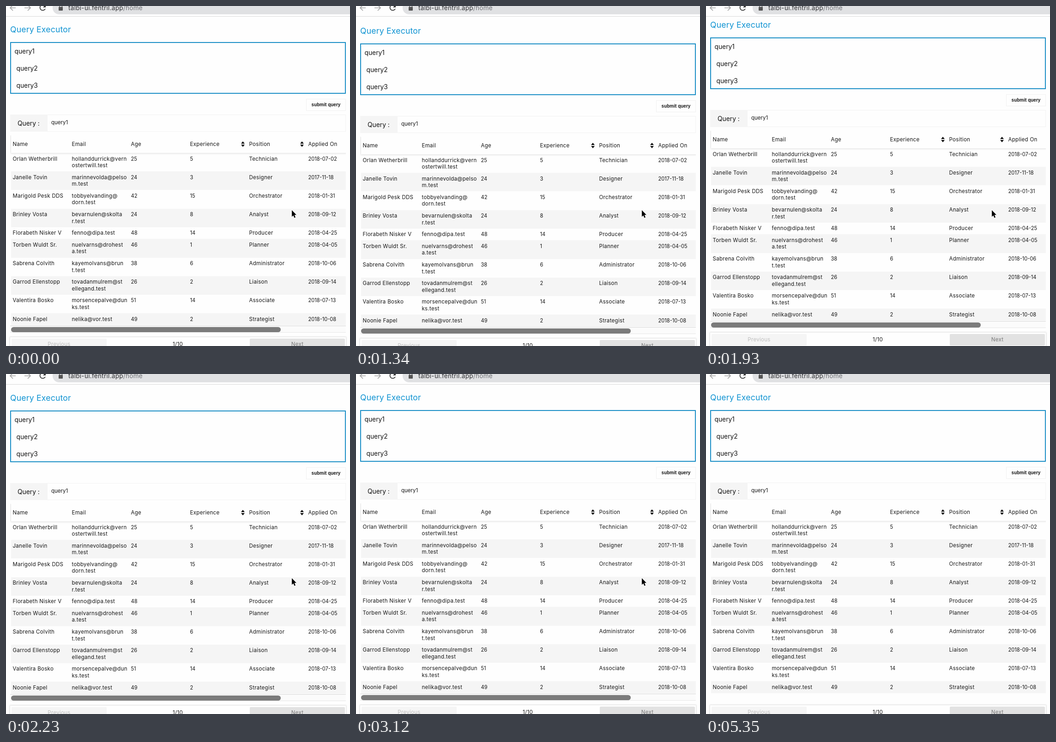
An HTML page that plays this animation: 745x736 px, repeating every 5.37 s.

```html
<!DOCTYPE html>
<html lang="en">
<head>
<meta charset="utf-8">
<title>Query Executor</title>
<style>
html, body { margin: 0; width: 100%; height: 100%; overflow: hidden; background: #fefefe; }
body { position: relative; font: 11.5px Inter, sans-serif; letter-spacing: .3px; color: #161616; }
div, span, svg { box-sizing: border-box; }
#bar, #page, #page > *, #bar > *, #cursor, #track, #thumb { position: absolute; }
#bar { left: 0; top: 0; width: 745px; height: 23px; overflow: hidden; background: #fefefe; border-bottom: 1px solid #d9d9d9; }
#pill { left: 101px; top: -10px; width: 680px; height: 28px; border-radius: 14px; background: #e0e1e3; }
#url { left: 135px; top: -6px; line-height: 20px; font-size: 13.5px; white-space: nowrap; color: #2b2c2f; }
#url i { font-style: normal; color: #6d6f73; }
#page { left: 0; top: 0; width: 745px; height: 760px; }
.t { line-height: 20px; white-space: nowrap; }
.big { font-size: 13.8px; letter-spacing: 0; color: #111; }
#title { left: 9px; top: 41px; font-size: 17.6px; letter-spacing: .2px; color: #0f93d2; }
#editor { left: 9px; top: 78px; width: 727px; height: 112px; border: 2px solid #1c8fc6; }
#submit { left: 650px; top: 201px; width: 86px; height: 26px; border: 1px solid #f1f1f1; text-align: center;
  font: bold 10px/24px "Liberation Sans", Arial, sans-serif; letter-spacing: 0; }
#field { left: 9px; top: 235px; width: 727px; height: 37px; border: 1px solid #f2f2f2; }
#label { left: 9px; top: 235px; width: 81px; height: 37px; background: #f5f5f5; }
#view { left: 9px; top: 280px; width: 727px; height: 428px; overflow: hidden; }
#table { position: absolute; left: 2px; top: 0; width: 896px; }
.row { display: flex; }
.row > span { width: 128px; padding: 5.5px 0 5.5px 3.5px; line-height: 14.6px; white-space: nowrap; }
.row:nth-child(odd):not(.head) { background: #f5f5f5; }
.row .num { font-size: 11.1px; letter-spacing: 0; }
.row.head { position: relative; height: 38px; box-shadow: 0 0 4px 1px #ddd; background: #fefefe; }
.head > span { position: relative; line-height: 38px; padding-top: 0; padding-bottom: 0; }
.sort::before, .sort::after { content: ""; position: absolute; left: 114px; border: solid transparent; border-width: 0 4.5px; }
.sort::before { top: 13px; border-bottom: 5px solid #111; }
.sort::after { top: 20px; border-top: 5px solid #111; }
#track { left: 0; top: 412px; width: 727px; height: 15px; background: #fbfbfb; border: solid #e6e6e6; border-width: 1px 0; border-top-color: #d6d6d6; }
#thumb { top: 2px; width: 584px; height: 11px; border-radius: 5.5px; background: #7b7b7b; }
#pager { left: 9px; top: 717px; width: 727px; height: 40px; box-shadow: 0 0 3px 1px #ddd; background: #fefefe; }
.btn { top: 720px; width: 206px; height: 25px; line-height: 24px; text-align: center; border-radius: 2px; }
#cursor { width: 14px; height: 20px; overflow: visible; }
</style>
</head>
<body>
<div id="page">
  <div id="title" class="t">Query Executor</div>
  <div id="editor"></div>
  <div class="t big" style="left:18.5px;top:88px">query1</div>
  <div class="t big" style="left:22.5px;top:125px">query2</div>
  <div class="t big" style="left:22.5px;top:162px">query3</div>
  <div id="submit">submit query</div>
  <div id="field"></div>
  <div id="label"></div>
  <div class="t big" style="left:25px;top:244px">Query :</div>
  <div class="t" style="left:98px;top:242px;letter-spacing:0">query1</div>
  <div id="view">
    <div id="table"></div>
    <div id="track"><div id="thumb"></div></div>
  </div>
  <div id="pager"></div>
  <div class="btn" style="left:12px;background:#f5f5f5;color:#bdbdbd">Previous</div>
  <div class="btn" style="left:269px">1/10</div>
  <div class="btn" style="left:528px;background:#e2e2e2;color:#777">Next</div>
</div>
<div id="bar">
  <div id="pill"></div>
  <svg width="130" height="22" style="left:0;top:0" fill="none" stroke-width="1.7">
    <path d="M21 4H9M15-2L9 4l6 6M40 4h13M47-2l6 6-6 6" stroke="#a5a5a5"/>
    <path d="M84.500 0A6 6 0 1 0 85 6" stroke="#333"/>
    <path d="M86-3v6h-6z" fill="#333"/>
    <path d="M116 3V0a2.700 2.700 0 0 1 5.400 0v3" stroke="#555" stroke-width="1.400"/>
    <rect x="114" y="2" width="9" height="8" rx="1" fill="#555"/>
  </svg>
  <div id="url">talbi-ui.fentril.app<i>/home</i></div>
</div>
<svg id="cursor"><path d="M0 0V14.200L3.200 11.200 5.500 16.500 8 15.400 5.700 10.200H10Z" fill="#000" stroke="#fff" stroke-width="1.600" paint-order="stroke"/></svg>
<script>
const $ = id => document.getElementById(id);

const heads = ["Name", "Email", "Age", "Experience", "Position", "Applied On", "status"];
const rows = `Orlan Wetherbrill|hollanddurrick@vern ostertwill.test|25|5|Technician|2018-07-02|rejected
Janelle Tovin|marinnevolda@pelso m.test|24|3|Designer|2017-11-18|waiting
Marigold Pesk DDS|tobbyelvanding@ dorn.test|42|15|Orchestrator|2018-01-31|approved
Brinley Vosta|bevarnulen@skolta r.test|24|8|Analyst|2018-09-12|rejected
Florabeth Nisker V|fenno@dipa.test|48|14|Producer|2018-04-25|waiting
Torben Wuldt Sr.|nuelvarns@drohest a.test|46|1|Planner|2018-04-05|rejected
Sabrena Colvith|kayemolvans@brun t.test|38|6|Administrator|2018-10-06|waiting
Garrod Ellenstopp|tovadanmulrem@st ellegand.test|26|2|Liaison|2018-09-14|waiting
Valentira Bosko|morsencepalve@dun ks.test|51|14|Associate|2018-07-13|approved
Noonie Fapel|nelika@vor.test|49|2|Strategist|2018-10-08|waiting`.split("\n").map(r => r.split("|"));

const cell = (text, i) =>
  `<span class="${/^\d/.test(text) ? "num" : ""}">${i === 1 ? text.replace(" ", "<br>") : text}</span>`;
$("table").innerHTML =
  `<div class="row head">${heads.map((h, i) => `<span class="${i > 2 && i < 6 ? "sort" : ""}">${h}</span>`).join("")}</div>` +
  rows.map(r => `<div class="row">${r.map(cell).join("")}</div>`).join("");

// Each step: [start time in ms, value...], held until the next one
const LOOP = 5370;
const scrollY = [[0, 0], [890, 1], [1040, 4], [1190, 5], [1340, 3], [1490, 1], [1630, -4],
  [1780, -9], [1930, -10], [2080, -2], [2230, 1], [2380, 0]];
const scrollX = [[0, 0], [2520, 172], [2970, 12], [3120, 0]];
const pointer = [[0, 618.5, 442], [3870, 728.5, 519], [4170, 696.5, 595.5], [4320, 690.5, 673],
  [4460, 711.5, 690], [4610, 724.5, 719], [4760, 725.5, 732], [4900, 726, 760]];
const fade = [[0, 1], [5200, .92], [5350, 0]];
const at = (steps, t) => steps.filter(s => s[0] <= t).pop().slice(1);

function draw(now) {
  const t = now % LOOP;
  const [x] = at(scrollX, t), [y] = at(scrollY, t), [px, py] = at(pointer, t), [alpha] = at(fade, t);
  $("page").style.top = y + "px";
  $("table").style.left = 2 - x + "px";
  $("thumb").style.left = 2 + x * 139 / 172 + "px";
  $("thumb").style.opacity = alpha;
  $("track").style.visibility = alpha ? "visible" : "hidden";
  $("cursor").style.left = px + "px";
  $("cursor").style.top = py + "px";
}

const start = performance.now();
function tick() {
  draw(performance.now() - start);
  requestAnimationFrame(tick);
}
tick();
</script>
</body>
</html>
```
